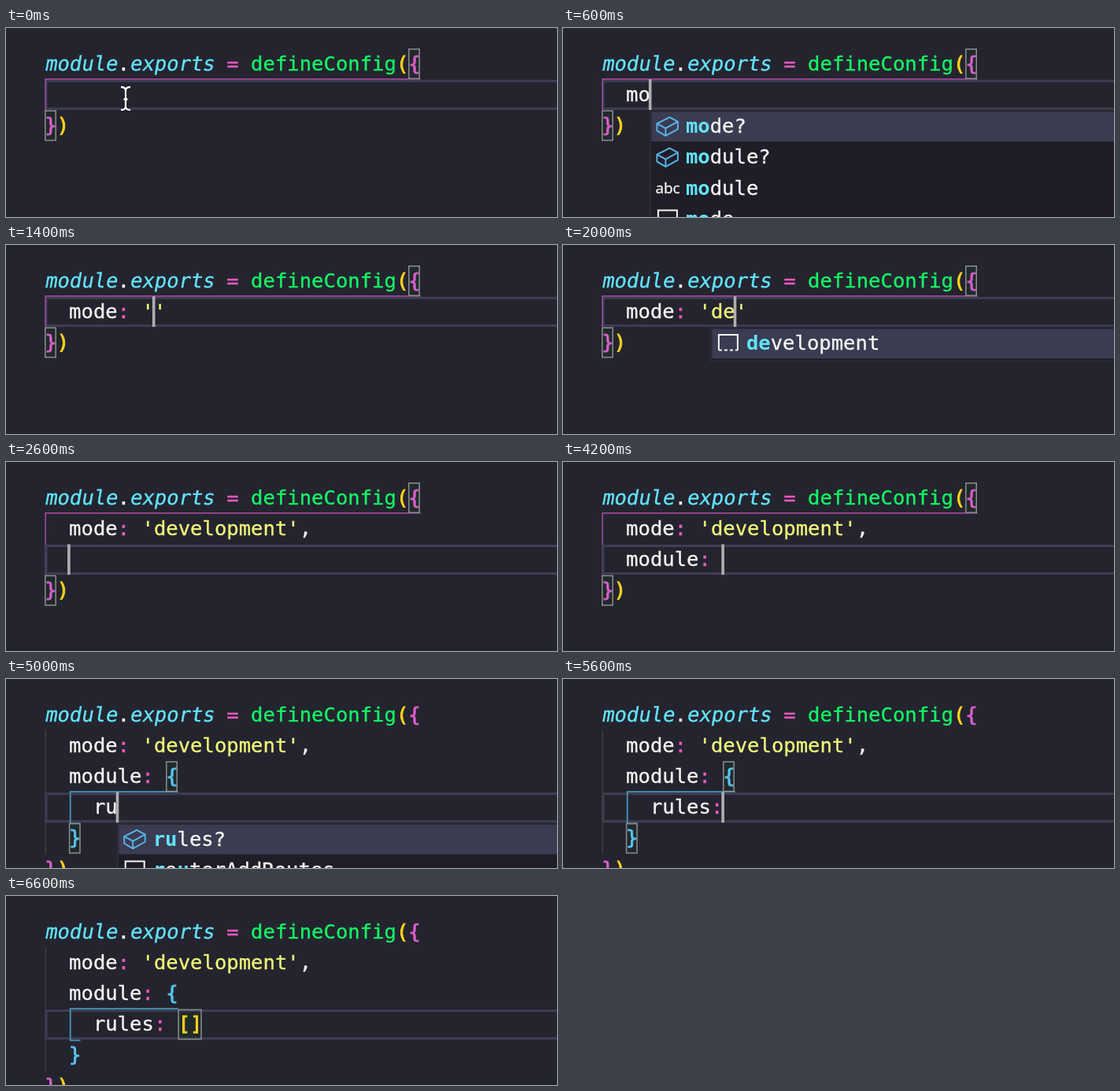
An HTML page for the animation above (6.8 s loop, 700x240 px).

```html
<!DOCTYPE html>
<html lang="en">
<head>
<meta charset="utf-8">
<title>Typing a config file</title>
<style>
  html, body { margin: 0; width: 100%; height: 100%; overflow: hidden; background: #24242f; }
  svg { display: block; width: 700px; height: 240px; }
  text { font: 25.58px "DejaVu Sans Mono", "Noto Sans Mono", monospace; white-space: pre; stroke-width: .35px; }
  .bracket { stroke-width: .9px; }
  .hit { font-weight: 700; fill: #62e4fb; stroke: none; }
  .abc { font: 400 19px "Open Sans", sans-serif; }
</style>
</head>
<body>
<svg id="stage" viewBox="0 0 700 240"></svg>
<script>
const stage = document.getElementById('stage');
const STEP = 200, LEFT = 49.3, CELL = 15.4, TOP = 26, ROW = 39.2;
const C = {
  white: '#f5f5f2', cyan: '#62e4fb', pink: '#ee5abf', green: '#12f765', gold: '#fbd51a',
  orchid: '#d85fca', blue: '#5ac3ee', string: '#f0f978', rim: '#3f3d54', box: '#86888b'
};

// What the current line holds at each step; "|" marks a caret inside a pair.
const typed = [
  '', '', 'm', 'mo', 'mod', 'mode', 'mode: ', "mode: '|'", "mode: '|'",
  "mode: 'd|'", "mode: 'de|'", "mode: 'development'", "mode: 'development',",
  '', '', '', '', 'm', 'mo', 'mod', 'module', 'module: ', 'module: {|}',
  '', 'r', 'ru', 'rul', 'rules', 'rules:', 'rules: ',
  'rules: [|]', 'rules: [|]', 'rules: [|]', 'rules: [|]'
];
const SECOND = 13, PAIR = 22, THIRD = 23, LIST = 30;
const blinkOff = [0, 15, 16, 33];

// Suggestion lists: first and last step, column, icon:label entries.
const lists = [
  [3, 5, 4, ['cube:mode?', 'cube:module?', 'abc:module', 'card:mode']],
  [8, 8, 9, ['card:development', 'card:none', 'card:production']],
  [9, 10, 9, ['card:development']],
  [18, 19, 4, ['cube:module?', 'abc:mode', 'card:mode']],
  [25, 26, 6, ['cube:rules?', 'card:routerAddRoutes']]
];

const colX = c => LEFT + c * CELL;
const rowY = r => TOP + r * ROW;
const rect = (x, y, w, h, attrs) => `<rect x="${x}" y="${y}" width="${w}" height="${h}" ${attrs}/>`;
const path = (d, color, width = 1.7) =>
  `<path d="${d}" fill="none" stroke="${color}" stroke-width="${width}"/>`;
const put = (x, y, s, color, cls = '') =>
  `<text x="${x}" y="${y}" fill="${color}" stroke="${color}" class="${cls}">${s}</text>`;
const text = (row, col, s, color) =>
  put(colX(col), rowY(row) + 27.5, s, color, /^[(){}\[\]]$/.test(s) ? 'bracket' : '');
const slanted = (col, s) =>
  `<g transform="translate(${colX(col) - .4} ${rowY(0) + 27.5}) skewX(-10)">${put(0, 0, s, C.cyan)}</g>`;
const frame = (row, col, n = 1) => rect(colX(col) + .5, rowY(row) + .8, n * CELL - 2, ROW - 1.8,
  `fill="rgba(0,100,0,.1)" stroke="${C.box}" stroke-width="1.6"`);

function colorOf(token) {
  if (token[0] === "'") return C.string;
  if (token === ':') return C.pink;
  if ('{}'.includes(token)) return C.blue;
  if ('[]'.includes(token)) return C.gold;
  return C.white;
}

function code(row, indent, line) {
  let out = '';
  for (const m of line.matchAll(/'[^']*'?|[:{}\[\],]|\w+/g))
    out += text(row, indent + m.index, m[0], colorOf(m[0]));
  return out;
}

function icon(kind, x, y) {
  if (kind === 'abc') return put(x + 6.5, y + 27, 'abc', C.white, 'abc');
  if (kind === 'card')
    return path(`M${x + 10} ${y + 29}V${y + 9.5}h24v19.5M${x + 10} ${y + 29}h4m3 0h4m3 0h4m3 0h3`, C.white, 2);
  return path(`M${x + 8.5} ${y + 17}l16-8 10.5 5.5v9.5l-15.5 8.5-11-6.5zl11 6v9.5m0-9.5l15.5-8.5`, '#58b4ea', 1.9);
}

function label(x, y, s, query) {
  let at = 0, spans = '';
  for (const ch of s) {
    const hit = ch === query[at];
    if (hit) at++;
    spans += hit ? `<tspan class="hit">${ch}</tspan>` : ch;
  }
  return put(x, y, spans, C.white);
}

function popup(row, col, items, query) {
  const x = colX(col), y = rowY(row + 1);
  let out = rect(x, y, 720 - x, items.length * ROW + 4, 'fill="#1f1e28" stroke="#2d2c38" stroke-width="2"');
  out += rect(x + 1.5, y + 2, 720 - x, ROW - 1.5, 'fill="#3b3c52"');
  items.forEach((item, i) => {
    const [kind, name] = item.split(':'), top = y + i * ROW;
    out += icon(kind, x, top) + label(x + 45, top + 28.7, name, query);
  });
  return out;
}

function pointer() {
  const d = 'M146 75q6 0 6 4.5q0-4.5 6-4.5M152 79V100M146 104q6 0 6-4.5q0 4.500 6 4.500M149.500 90.500h5';
  return path(d, '#15151c', 4.6) + path(d, '#fff', 2.3);
}

function guides(step, end) {
  if (step < THIRD)
    return path(`M${colX(31)} ${rowY(1) - .4}H50.200V${rowY(end)}`, '#9a4898');
  return path(`M50.400 ${rowY(1)}V${rowY(end)}`, '#3f3e49', 1.4) +
    path(`M${colX(11)} ${rowY(3) - .4}H81.700V${rowY(4) + .6}H${colX(3) - 1}`, '#4a93b5', 1.8);
}

function draw(step) {
  const row = step < SECOND ? 1 : step < THIRD ? 2 : 3;
  const end = row === 3 ? 5 : row + 1;
  const indent = row === 3 ? 4 : 2;
  const raw = typed[step], line = raw.replace('|', '');
  const caret = indent + (raw.includes('|') ? raw.indexOf('|') : raw.length);

  const rim = rect(51, rowY(row) + 2.1, 700, ROW - 4.1, `fill="none" stroke="${C.rim}" stroke-width="3"`);
  const lines = guides(step, end);
  let out = row === 2 ? lines + rim : rim + lines;

  if (step >= LIST) out += frame(3, 11, 2);
  else if (step >= THIRD) out += frame(2, 10) + frame(4, 2);
  else if (step === PAIR) out += frame(2, 10) + frame(2, 11);
  else out += frame(0, 30) + frame(end, 0);

  out += slanted(0, 'module') + text(0, 6, '.', C.white) + slanted(7, 'exports') +
    text(0, 15, '=', C.pink) + text(0, 17, 'defineConfig', C.green) +
    text(0, 29, '(', C.gold) + text(0, 30, '{', C.orchid);
  if (row > 1) out += code(1, 2, "mode: 'development',");
  if (row > 2) out += code(2, 2, 'module: {') + code(4, 2, '}');
  out += code(row, indent, line);
  out += text(end, 0, '}', C.orchid) + text(end, 1, ')', C.gold);

  const list = lists.find(l => step >= l[0] && step <= l[1]);
  if (list) out += popup(row, list[2], list[3], line.match(/\w*(?='?$)/)[0]);
  if (!blinkOff.includes(step))
    out += rect(colX(caret) - 2, rowY(row), 3.6, ROW - .4, 'fill="#aeaeb0"');
  if (step < 2) out += pointer();
  stage.innerHTML = out;
}

let shown = -1;
function tick() {
  const step = Math.floor(performance.now() / STEP) % typed.length;
  if (step !== shown) draw(shown = step);
  requestAnimationFrame(tick);
}
tick();
</script>
</body>
</html>
```
